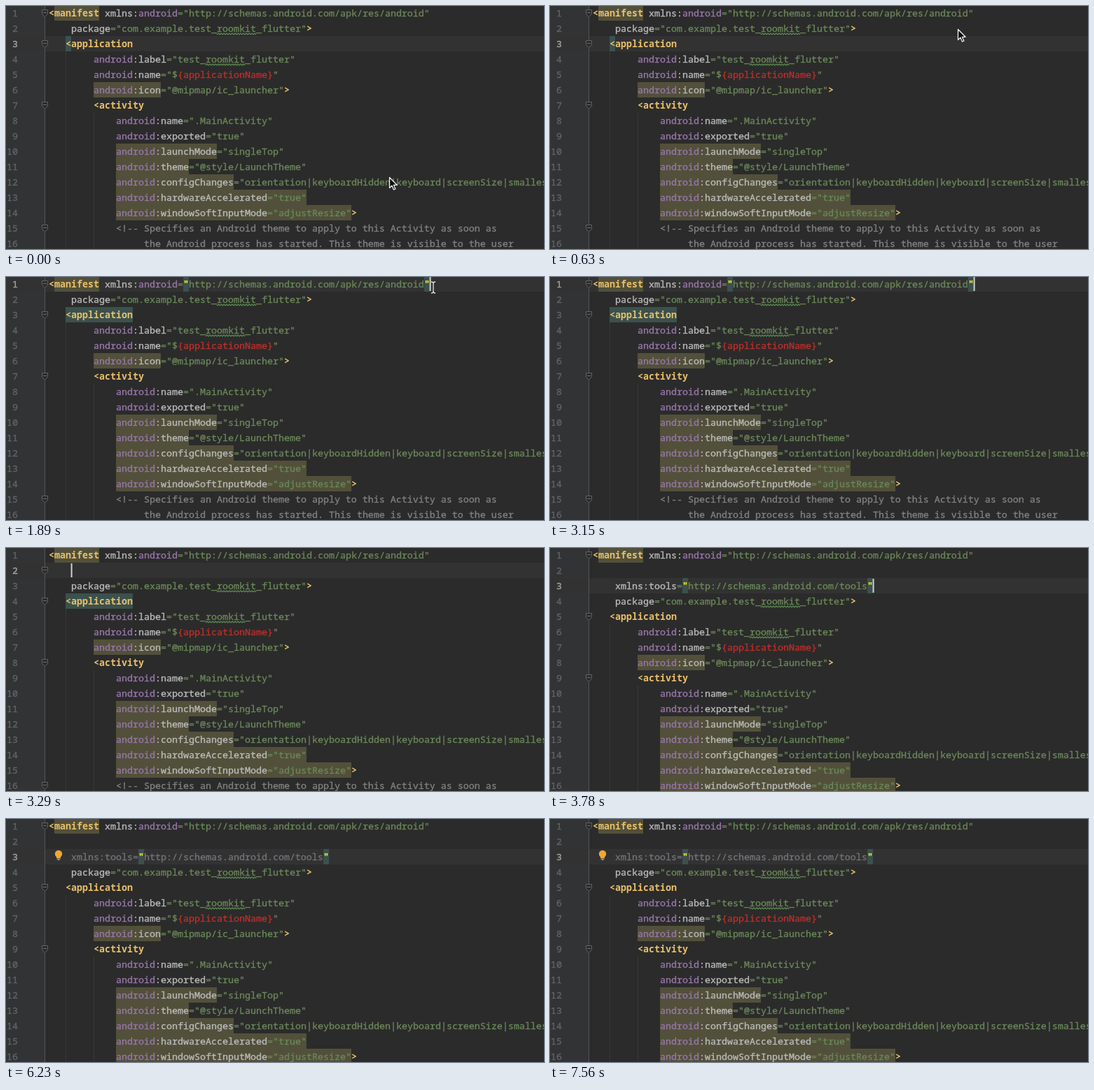
Write an HTML page with a canvas that moves like this. It is 768 px wide and 348 px high and loops after 8 s.

```html
<!DOCTYPE html>
<html lang="en">
<head>
<meta charset="utf-8">
<title>Manifest editor</title>
<style>
html, body { margin: 0; width: 100%; height: 100%; overflow: hidden; background: #2b2b2b; }
canvas { display: block; width: 768px; height: 348px; }
</style>
</head>
<body>
<canvas id="stage"></canvas>
<script>
const W = 768, H = 348, LOOP = 8000, STEP = 70;
const ROW = 22, TOP = -1, CH = 8, LEFT = 61, BASE = 16;
const FONT = '"Noto Sans Mono", "Liberation Mono", monospace';
const C = {
  bg: '#2b2b2b', gutter: '#313335', edge: '#555555', current: '#323232', guide: '#383838',
  num: '#606366', numOn: '#a4a3a3', tag: '#e8bf6a', ns: '#9876aa', attr: '#bababa',
  str: '#6a8759', note: '#808080', error: '#bc2f2b', unused: '#72737a',
  mark: '#52503a', pair: '#3b514d', pairText: '#ffef28', caret: '#d0d0d0', typo: '#5c8c53'
};

const canvas = document.getElementById('stage');
const g = canvas.getContext('2d');
const dpr = window.devicePixelRatio || 1;
canvas.width = W * dpr;
canvas.height = H * dpr;

// mark: [first, last) column of the warning background, relative to the text
const line = (col, text, opts = {}) => ({ col, text, ...opts });
const code = [
  line(0, '<manifest xmlns:android="http://schemas.android.com/apk/res/android"', { mark: [1, 9], fold: true }),
  line(4, 'package="com.example.test_roomkit_flutter">'),
  line(3, '<application', { fold: true }),
  line(8, 'android:label="test_roomkit_flutter"'),
  line(8, 'android:name="${applicationName}"'),
  line(8, 'android:icon="@mipmap/ic_launcher">', { mark: [0, 12] }),
  line(8, '<activity', { fold: true }),
  line(12, 'android:name=".MainActivity"'),
  line(12, 'android:exported="true"'),
  line(12, 'android:launchMode="singleTop"', { mark: [0, 18] }),
  line(12, 'android:theme="@style/LaunchTheme"', { mark: [0, 13] }),
  line(12, 'android:configChanges="orientation|keyboardHidden|keyboard|screenSize|smallestScreenSize"', { mark: [0, 21] }),
  line(12, 'android:hardwareAccelerated="true"', { mark: [0, 34] }),
  line(12, 'android:windowSoftInputMode="adjustResize">', { mark: [0, 42] }),
  line(12, '<!-- Specifies an Android theme to apply to this Activity as soon as', { fold: true, color: C.note }),
  line(17, 'the Android process has started. This theme is visible to the user', { color: C.note })
];
const blank = line(4, '');
const tools = line(4, 'xmlns:tools="http://schemas.android.com/tools"');

const TOKEN = /="[^"]*"|<\w+|>|\bandroid\b|:?\w+:?/g;
const PARTS = /\{\w+\}|[^{}]+/g;

// pointer position per 70 ms step, starting at 0
const path = [
  [547, 245], [551, 264], [560, 292], [568, 304], [572, 252], [546, 152], [506, 80], [506, 80],
  [549, 53], [582, 33], [600, 21], [612, 11], [619, 4], [622, 0], [620, 2], [616, 5], [612, 8], [610, 9]
];

const within = (t, a, b) => t >= a && t < b;
const colX = col => LEFT + col * CH;
const rowY = row => TOP + row * ROW;

function box(x, y, w, h, color) {
  g.fillStyle = color;
  g.fillRect(x, y, w, h);
}

// a hairline in the text colour gives the regular weight a little more body
function write(text, x, row, color, weight = 400) {
  const y = rowY(row) + BASE;
  g.font = `${weight} 13.333px ${FONT}`;
  g.fillStyle = g.strokeStyle = color;
  g.lineWidth = 0.35;
  g.lineJoin = 'round';
  g.fillText(text, x, y);
  if (weight === 400) g.strokeText(text, x, y);
}

function tokenColor(s) {
  if (s[0] === '<' || s === '>') return C.tag;
  return s === 'android' ? C.ns : C.attr;
}

function drawLine({ col, text, mark, color }, row) {
  const x = colX(col);
  if (mark) box(x + mark[0] * CH, rowY(row), (mark[1] - mark[0]) * CH, ROW, C.mark);
  if (color) return write(text, x, row, color);
  for (const m of text.matchAll(TOKEN)) {
    const s = m[0], tx = x + m.index * CH;
    if (s[0] === '=') {
      for (const p of s.matchAll(PARTS)) {
        write(p[0], tx + p.index * CH, row, p[0][0] === '{' ? C.error : C.str);
      }
    } else {
      const c = tokenColor(s);
      write(s, tx, row, c, c === C.tag ? 700 : 400);
    }
  }
  const typo = text.indexOf('roomkit');
  if (typo >= 0) squiggle(x + typo * CH, rowY(row) + 18, 7 * CH);
}

function squiggle(x, y, w) {
  g.beginPath();
  for (let i = 0; i <= w; i += 2) g.lineTo(x + i, y + (i % 4 ? 0 : 2));
  g.strokeStyle = C.typo;
  g.lineWidth = 1.1;
  g.stroke();
}

function drawFold(row) {
  const y = rowY(row) + 6.5;
  g.beginPath();
  g.moveTo(51.5, y);
  g.lineTo(59.5, y);
  g.lineTo(59.5, y + 6);
  g.lineTo(55.5, y + 10);
  g.lineTo(51.5, y + 6);
  g.closePath();
  g.fillStyle = C.bg;
  g.fill();
  g.strokeStyle = '#606263';
  g.lineWidth = 1;
  g.stroke();
  box(53, y + 3.5, 5, 1, '#6c6e6f');
}

function drawGuide(x, row) {
  box(x, rowY(row), 1, H, C.guide);
}

function drawPair(row, cols) {
  for (const col of cols) {
    box(colX(col), rowY(row), CH, ROW, C.pair);
    write('"', colX(col), row, C.pairText, 700);
  }
}

function drawCaret(col, row) {
  box(colX(col) - 0.4, rowY(row) + 1, 2, 20, C.caret);
}

function drawBulb(x, y) {
  g.beginPath();
  g.arc(x, y, 5.2, 0, Math.PI * 2);
  g.fillStyle = '#f0a732';
  g.fill();
  box(x - 3, y + 3, 6, 3, '#f0a732');
  box(x - 2.5, y + 6.5, 5, 1, '#afb1b3');
  box(x - 1.5, y + 8, 3, 1, '#afb1b3');
}

function drawArrow([x, y]) {
  g.beginPath();
  for (const [dx, dy] of [[0, 0], [0, 15], [3.4, 11.8], [6, 17.5], [8.4, 16.4], [5.9, 10.8], [10.6, 10.8]]) {
    g.lineTo(x + dx + 0.5, y + dy + 0.5);
  }
  g.closePath();
  g.fillStyle = '#0c0c0c';
  g.fill();
  g.strokeStyle = '#f2f2f2';
  g.lineWidth = 1.3;
  g.lineJoin = 'round';
  g.stroke();
}

function drawBeam(x, y) {
  g.beginPath();
  for (const side of [-3, 3]) {
    g.moveTo(x + side, y - 8);
    g.quadraticCurveTo(x, y - 8, x, y - 6);
    g.lineTo(x, y + 6);
    g.quadraticCurveTo(x, y + 8, x + side, y + 8);
  }
  g.strokeStyle = '#e6e6e6';
  g.lineWidth = 1.3;
  g.stroke();
}

function currentRow(t) {
  if (t < 1540) return 2;
  if (t < 3290) return 0;
  return t < 3710 ? 1 : 2;
}

function drawCarets(t) {
  if (within(t, 1540, 2520) || within(t, 3080, 3290)) drawCaret(68, 0);
  if (within(t, 3290, 3710)) drawCaret(4, 1);
  if (within(t, 3710, 5180) || within(t, 5670, 6230) || within(t, 6720, 7560)) drawCaret(50, 2);
}

function drawPointer(t) {
  if (t < 1330) drawArrow(path[Math.min(Math.floor(t / STEP), path.length - 1)]);
  else if (t < 3150) drawBeam(610, 15);
  else if (within(t, 4830, 4900)) drawBeam(624, 4);
}

function draw(t) {
  const entered = t >= 3290, pasted = t >= 3710;
  const added = pasted ? [blank, { ...tools, color: t >= 4130 ? C.unused : null }] : entered ? [blank] : [];
  const rows = [code[0], ...added, ...code.slice(1)].slice(0, 16);
  const shift = added.length, now = currentRow(t);

  g.setTransform(dpr, 0, 0, dpr, 0, 0);
  box(0, 0, W, H, C.bg);
  box(0, 0, 55, H, C.gutter);
  box(0, rowY(now), W, ROW, C.current);
  drawGuide(85, 3 + shift);
  drawGuide(125, 7 + shift);
  box(55, 0, 1, H, C.edge);

  if (!pasted) box(colX(3), rowY(2 + shift), (t < 1820 ? 1 : 12) * CH, ROW, C.pair);

  g.textAlign = 'right';
  rows.forEach((_, i) => write(i + 1, 17, i, i === now ? C.numOn : C.num));
  g.textAlign = 'left';
  rows.forEach((r, i) => {
    drawLine(r, i);
    // the first fold follows the inserted break until the text is parsed again
    if (r.fold) drawFold(i === 0 && entered && !pasted ? 1 : i);
  });

  if (within(t, 1820, 3290)) drawPair(0, [24, 67]);
  if (pasted) drawPair(2, [16, 49]);
  if (t >= 4690) drawBulb(75, 50);
  drawCarets(t);
  drawPointer(t);
}

const start = performance.now();
function tick() {
  draw((performance.now() - start) % LOOP);
  requestAnimationFrame(tick);
}
tick();
</script>
</body>
</html>
```
